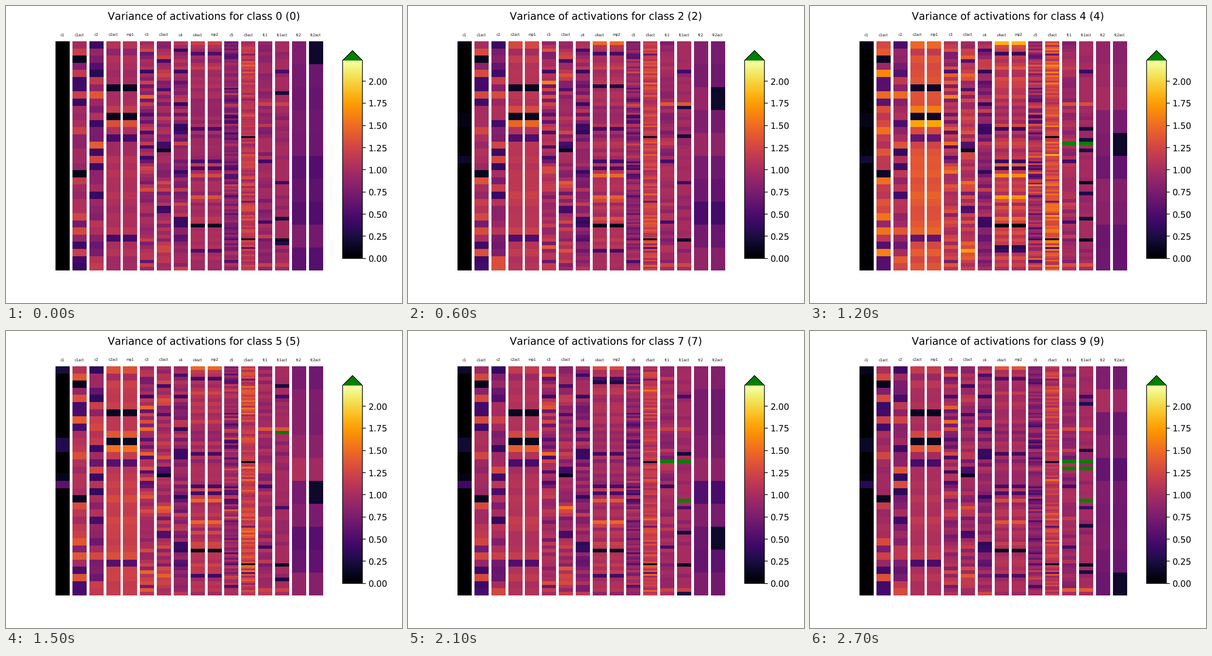
Recreate the animation shown at these times as a matplotlib script. Size 864 px wide and 648 px high, loop 3000 ms.

```python
import numpy as np
import matplotlib.pyplot as plt
from matplotlib.animation import FuncAnimation
from matplotlib.cm import ScalarMappable
from matplotlib.colors import Normalize

plt.rcParams.update({
    "font.family": "DejaVu Sans",
    "text.hinting": "none",
    "text.kerning_factor": 6,
})

CLASSES = np.arange(10)
ENERGY = np.array([.96, 1.55, 1.03, 1.1, 1.2, 1.08, 1.03, 1, 1, .98])
TOP = 2.234


def column(seed, rows, level, response, spread, dips=0, jitter=.04,
           contrast=0, rare=0, dead=(), weak=(), strong=()):
    """Activation variance, one line per class.

    A seeded profile with a share of dips and a few fixed rows is shared by
    all classes; each class scales it by its energy and adds jitter.
    """
    rng = np.random.default_rng(seed)
    profile = np.clip(rng.normal(1, spread, rows), .3, 1.5)
    profile[rng.random(rows) < dips] *= .6
    for keys, value in (dead, .12), (weak, .47), (strong, 1.32):
        profile[list(keys)] = value

    energy = ENERGY[:, None]
    values = level * energy ** response * profile ** energy ** contrast
    values *= rng.normal(1, jitter, values.shape)
    values[rng.random(values.shape) < rare] *= .25
    return np.clip(values, .01, .96 * TOP)


def first_layer():
    """Almost silent; a few rows wake up, peak at class 5 and fade."""
    strength = np.where(CLASSES < 5, np.minimum(.08 * CLASSES, .2),
                        .6 * .85 ** (CLASSES - 5.0))
    profile = np.full(32, .01)
    profile[[0, 10, 11, 15, 16]] = .4, .48, .48, .2, 1
    return strength[:, None] * profile


def overflow(values, bursts):
    for row, classes in bursts.items():
        values[list(classes), row] = 1.1 * TOP
    return values


pool1 = column(3, 32, 1.08, 1.25, .05, jitter=.02, dead=(6, 10),
               weak=(13, 27), strong=(11,))
pool2 = column(7, 64, 1.04, .75, .08, contrast=2, rare=.01, dead=(51,),
               weak=(3, 24, 33, 35, 58), strong=(0, 37, 43))

bursts = {26: (7, 9), 28: (4, 9)}
dense = column(10, 64, .97, .15, .1, jitter=.06, weak=(33, 50),
               strong=(17, 62))
dense_act = np.minimum(column(11, 64, 1, 0, .08, rare=.05, dead=(55,),
                              weak=(8, 39)), 1)
dense_act[:, [17, 62]] = dense[:, [17, 62]]

scores = column(12, 10, .74, .9, .08, jitter=.14)
scores_act = .92 * scores
scores_act[CLASSES, CLASSES] = .17  # a class is quiet in its own output

layers = {
    "c1": first_layer(),
    "c1act": column(1, 32, .97, 1.1, .12, dead=(2, 18),
                    weak=(5, 6, 8, 28, 30, 31),
                    strong=(1, 4, 7, 12, 19, 24, 26, 29)),
    "c2": column(2, 32, .92, .4, .12, jitter=.1,
                 weak=(0, 4, 11, 15, 17, 21), strong=(7, 14, 16, 30, 31)),
    "c2act": pool1,
    "mp1": pool1,
    "c3": column(4, 64, 1.03, .8, .16, dips=.15, jitter=.08, weak=(25, 29)),
    "c3act": column(5, 64, 1.02, .7, .14, jitter=.06, dead=(30,),
                    weak=(5, 13, 28, 29, 46, 47), strong=(39,)),
    "c4": column(6, 64, .84, 0, .18, jitter=.08,
                 weak=(8, 17, 23, 24, 25, 36, 49, 50, 51),
                 strong=(7, 21, 48, 63)),
    "c4act": pool2,
    "mp2": pool2,
    "c5": column(8, 128, .92, .9, .1, dips=.2, jitter=.08, contrast=1.5),
    "c5act": column(9, 128, 1.17, .65, .08, dips=.06, jitter=.06,
                    contrast=2, dead=(53, 110)),
    "fc1": overflow(dense, bursts),
    "fc1act": overflow(dense_act, bursts | {18: (5,), 37: (7, 9)}),
    "fc2": scores,
    "fc2act": scores_act,
}

cmap = plt.get_cmap("inferno").with_extremes(over="green")
norm = Normalize(0, TOP)

fig, axes = plt.subplots(1, len(layers), figsize=(6.4, 4.8), dpi=135)
fig.subplots_adjust(right=.8, top=.8812)
heading = fig.suptitle("", fontsize=12)

images = []
for ax, (name, values) in zip(axes, layers.items()):
    ax.set_title(name, fontsize=4)
    ax.axis("off")
    images.append(ax.imshow(values[:1].T, cmap=cmap, norm=norm,
                            aspect="auto", interpolation="nearest"))

fig.colorbar(ScalarMappable(norm, cmap), extend="max",
             cax=fig.add_axes([.85, .15, .05, .7]))


def update(k):
    heading.set_text(f"Variance of activations for class {k} ({k})")
    for image, values in zip(images, layers.values()):
        image.set_data(values[k][:, None])
    return [heading, *images]


anim = FuncAnimation(fig, update, frames=len(CLASSES), interval=300,
                     repeat=True)
plt.show()
```
